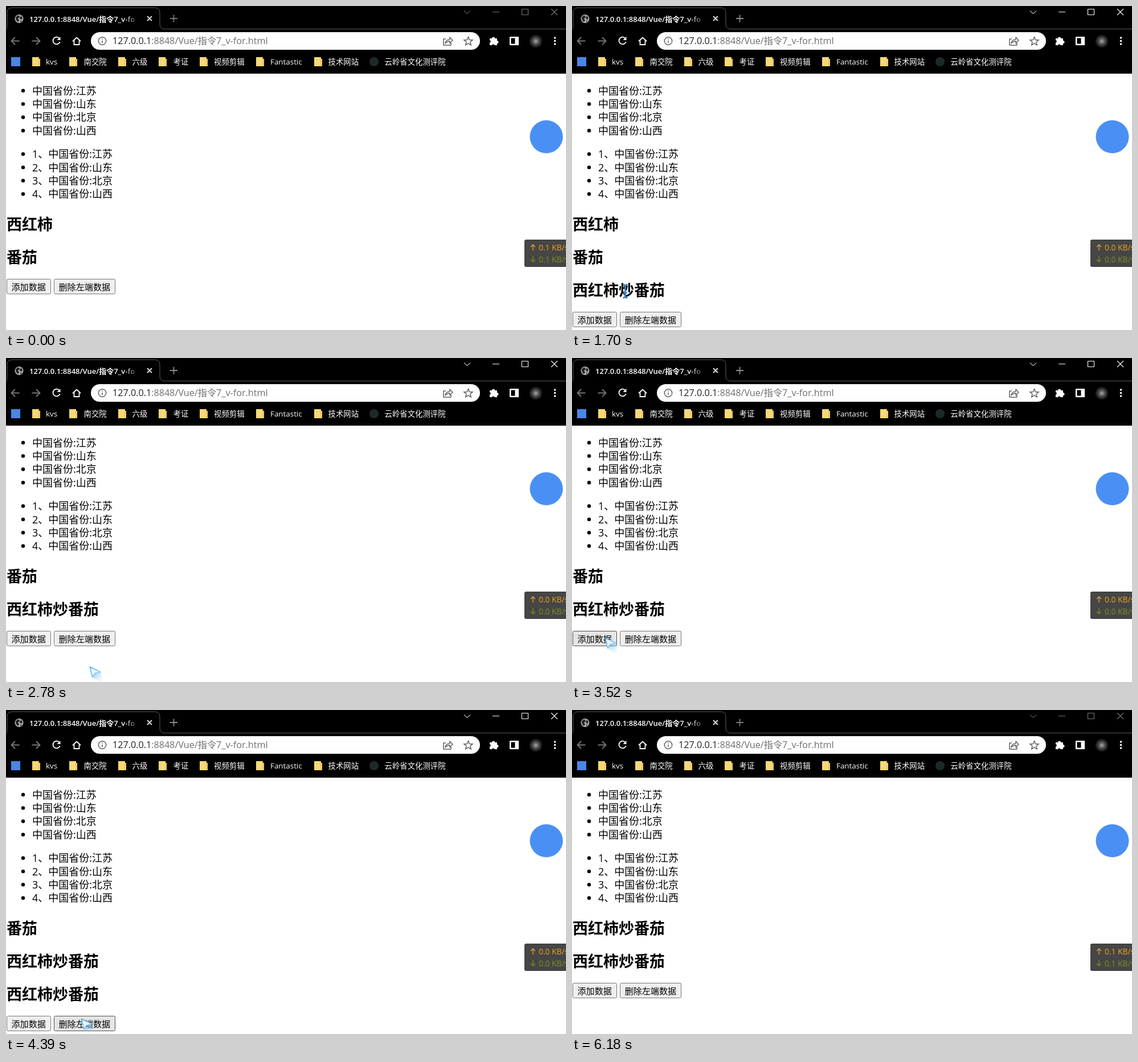
These frames come from a looping animation (983x570 px, 6250 ms). An HTML page:

```html
<!DOCTYPE html>
<html lang="zh">
<head>
<meta charset="utf-8">
<title>v-for</title>
<style>
html, body { margin: 0; width: 100%; height: 100%; overflow: hidden; background: #fff; }
svg { display: block; width: 983px; height: 570px; }
text { font-family: "Open Sans", "Noto Sans CJK SC", "Noto Sans CJK", sans-serif; white-space: pre; }
.line { fill: none; stroke-width: 1.8; }
.list { font-size: 18px; }
.head { font-size: 27px; font-weight: 700; }
.btn { font-size: 15.1px; }
.mark { font-size: 13.4px; font-weight: 500; fill: #fff; }
.net { font-size: 13.8px; }
</style>
</head>
<body>
<svg viewBox="0 0 983 570" xmlns="http://www.w3.org/2000/svg">
  <defs>
    <linearGradient id="fade" gradientUnits="userSpaceOnUse" x1="205" x2="237" y1="0" y2="0">
      <stop offset="0" stop-color="#fff"/><stop offset="1" stop-color="#fff" stop-opacity="0"/>
    </linearGradient>
    <radialGradient id="photo">
      <stop offset="0" stop-color="#a9a9a9"/><stop offset=".5" stop-color="#4a4c4e"/><stop offset="1" stop-color="#0c0c0c"/>
    </radialGradient>
    <linearGradient id="ice" x1="0" y1="0" x2="1" y2="1">
      <stop offset="0" stop-color="#4aa3e6"/><stop offset="1" stop-color="#9ad6f6"/>
    </linearGradient>
    <linearGradient id="trail" gradientUnits="userSpaceOnUse" x1="7" y1="9" x2="23" y2="27">
      <stop offset="0" stop-color="#6cb6ee" stop-opacity=".7"/><stop offset="1" stop-color="#b5e2fa" stop-opacity="0"/>
    </linearGradient>
  </defs>

  <rect width="983" height="570" fill="#fff"/>
  <rect width="983" height="119" fill="#000"/>

  <!-- tab strip -->
  <path d="M0 41Q2 40 2 34V12Q2 3 11 3H261Q270 3 270 12V32Q270 40.5 279 40.5H983" fill="none" stroke="#5c5c5c"/>
  <circle cx="23" cy="22.500" r="7.500" fill="#a9adb1"/>
  <path d="M17 20q3-4 6-3l1 3-3 2 2 3-2 3q-4-3-4-8zM26 17l3 4-2 3-3-2zM25 26l3-1-3 4z" fill="#222"/>
  <text x="41" y="27.800" font-size="13" font-weight="600" fill="url(#fade)">127.0.0.1:8848/Vue/指令7_v-fo</text>
  <path d="M248 18l8 8m0-8l-8 8" class="line" stroke="#e8e8e8"/>
  <path id="plus" d="M288 22h13m-6.500-6.500v13" class="line"/>
  <g id="controls" fill="none" stroke-width="1.100">
    <path d="M804 8.500l5.500 5 5.500-5" opacity=".7"/>
    <path d="M854 10.500h12M905.500 5.500h11v10h-11zM957 5l11 11m0-11l-11 11"/>
  </g>

  <!-- toolbar -->
  <g class="line" stroke="#777">
    <path d="M23.500 61.500H10m6-6.500l-6.500 6.500 6.500 6.500M45.500 61.500H59m-6-6.500l6.500 6.500-6.500 6.500"/>
  </g>
  <g class="line" stroke="#fff">
    <path d="M94 57.500a6.300 6.300 0 1 0 .7 5.500"/>
    <path d="M117 62l7-6.500 7 6.500M119.500 60.500v7.500h9v-7.500"/>
  </g>
  <path d="M95.500 54v6h-6z" fill="#fff"/>
  <rect x="149" y="46" width="683" height="31" rx="15.500" fill="#fff"/>
  <g class="line" stroke="#5f6368" style="stroke-width:1.5">
    <circle cx="169" cy="61.500" r="6.700"/>
    <path d="M169 60.500v4.500m0-8v1.700"/>
    <path d="M772 58h-4v11h13v-4M771 66q1-7 8-7v-4l5 5.500-5 5v-3.500q-5 0-8 4z" stroke-linejoin="round"/>
    <path d="M811.500 54.500l2.100 5 5.400.4-4.100 3.500 1.300 5.300-4.700-2.900-4.700 2.900 1.300-5.300-4.100-3.500 5.400-.4z"/>
  </g>
  <text x="187" y="67.300" font-size="16.150" fill="#6b6f74"><tspan fill="#202124">127.0.0.1</tspan>:8848/Vue/指令7_v-for.html</text>
  <path d="M849 57h4a2.500 2.500 0 0 1 5 0h4v4a2.500 2.500 0 0 1 0 5v3h-4.500a2.300 2.300 0 0 0-4.500 0h-4v-4.500a2.300 2.300 0 0 0 0-4.500z" fill="#fff"/>
  <path d="M884 54h16v15h-16zm2.500 2.500v10h7v-10z" fill="#fff" fill-rule="evenodd"/>
  <circle cx="930" cy="62" r="11.500" fill="url(#photo)"/>
  <g fill="#fff"><circle cx="963.500" cy="56" r="1.800"/><circle cx="963.500" cy="61.500" r="1.800"/><circle cx="963.500" cy="67" r="1.800"/></g>

  <g id="marks"></g>
  <g id="page"></g>

  <!-- floating widgets -->
  <circle cx="948.500" cy="230" r="29" fill="#4a90f4"/>
  <rect x="910.500" y="411.500" width="80" height="47" rx="2" fill="#464646" stroke="#383838"/>
  <g id="net"></g>

  <g id="arrow">
    <path d="M4 18L9 11.500 19 9 24 26 19 28z" fill="url(#trail)"/>
    <path d="M.5.5L4.500 18.500 9.300 11.700 19 9.500z" fill="#e8f6fd" stroke="url(#ice)" stroke-width="1.500" stroke-linejoin="round"/>
  </g>
  <path id="beam" d="M-4-11q3 0 4 2 1-2 4-2M0-9V10M-4 12q3 0 4-2 1 2 4 2M-3 3h6" fill="none" stroke="#3b86bf" stroke-width="2.800"/>
</svg>
<script>
const LOOP = 6250, STEP = 67.1, ROW = 58.3;
const $ = id => document.getElementById(id);
const text = (cls, x, y, s, more = "") => `<text class="${cls}" x="${x}" y="${y}" ${more}>${s}</text>`;

// bookmarks: icon centre, label start, label
const folders = [
  [53, 70, "kvs"], [118, 136.5, "南交院"], [204, 221.5, "六级"], [275, 293.5, "考证"],
  [347, 365, "视频剪辑"], [446, 464, "Fantastic"], [548, 565.5, "技术网站"]
];
$("marks").innerHTML =
  `<rect x="9" y="90" width="16" height="16" fill="#4a86e8"/>` +
  folders.map(([c, x, s]) =>
    `<path d="M${c - 7} 90h12v3h2v13h-14z" fill="#f6d978"/><path d="M${c + 5} 93v13" stroke="#dcb04c"/>` +
    text("mark", x, 103.3, s)).join("") +
  `<circle cx="646" cy="98" r="8" fill="#1c2b29"/>` + text("mark", 664.5, 103.3, "云岭省文化测评院");

// page
const places = ["江苏", "山东", "北京", "山西"];
const list = (top, label) => places.map((p, i) => {
  const y = top + i * 23.4;
  return `<circle cx="30" cy="${y}" r="3.2"/>` + text("list", 46, y + 6.6, label(p, i));
}).join("");
const button = (id, x, w, s) =>
  `<rect id="${id}" x="${x + .5}" y="480.5" width="${w - 1}" height="26" rx="2"/>` + text("btn", x + 8.5, 499.6, s);
$("page").innerHTML =
  list(149, p => "中国省份:" + p) +
  list(260.5, (p, i) => `${i + 1}、中国省份:${p}`) +
  [0, 1, 2].map(i => text("head", 1, 393.5 + i * ROW, "", `id="head${i}"`)).join("") +
  `<g id="buttons">${button("add", 1, 78, "添加数据")}${button("del", 84, 108, "删除左端数据")}</g>`;

const rates = [["up", 430, "#f0a21e", "M925 430v-10m-4 4l4-4 4 4"], ["down", 450.5, "#808f1c", "M925 440v10m-4-4l4 4 4-4"]];
$("net").innerHTML = rates.map(([id, y, c, d]) =>
  `<path d="${d}" fill="none" stroke="${c}" stroke-width="1.3"/>` +
  text("net", 935, y, "", `id="${id}" fill="${c}"`)).join("");

// cursor path: time, x, y
const path = [
  [350, 130, 560], [420, 100, 540], [480, 75, 524], [550, 63, 518], [680, 63, 518], [820, 64, 510],
  [1020, 58, 492], [1500, 58, 492], [1690, 93, 501], [1900, 131, 528], [2027, 144, 536],
  [2090, 146, 541], [2190, 146, 541], [2225, 147, 543], [3060, 147, 543], [3280, 102, 517],
  [3500, 58, 492], [3850, 58, 492], [4070, 82, 503], [4370, 132, 543], [4500, 131, 543],
  [4990, 131, 543], [5045, 150, 540], [5180, 290, 545], [5310, 480, 562], [5380, 520, 600]
];

function cursorAt(t) {
  const i = path.findIndex(k => k[0] > t);
  if (i < 1) return null;
  const [t0, x0, y0] = path[i - 1], [t1, x1, y1] = path[i];
  const u = (t - t0) / (t1 - t0);
  return { x: x0 + (x1 - x0) * u, y: y0 + (y1 - y0) * u };
}

// clicks: press time, release time, headings afterwards
const A = "西红柿", B = "番茄", C = "西红柿炒番茄";
const clicks = [[1440, 1505, [A, B, C]], [2720, 2780, [B, C]], [3790, 3857, [B, C, C]], [4650, 4710, [C, C]]];

function paintButton(id, x, w, dy, pos, down) {
  const over = pos && pos.x >= x && pos.x <= x + w && pos.y >= 480 + dy && pos.y <= 507 + dy;
  const [fill, edge] = !over ? ["#efefef", "#767676"] : down ? ["#f5f5f5", "#8d8d8d"] : ["#e5e5e5", "#4f4f4f"];
  $(id).setAttribute("fill", fill);
  $(id).setAttribute("stroke", edge);
}

function place(id, shown, pos) {
  $(id).style.display = shown ? "" : "none";
  if (shown) $(id).setAttribute("transform", `translate(${pos.x} ${pos.y})`);
}

function render(t) {
  let items = [A, B];
  for (const [, up, next] of clicks) if (t >= up) items = next;
  const down = clicks.some(([a, b]) => t >= a && t < b);
  for (let i = 0; i < 3; i++) $("head" + i).textContent = items[i] || "";
  const dy = (items.length - 2) * ROW;
  $("buttons").setAttribute("transform", `translate(0 ${Math.round(dy)})`);

  // the pointer refreshes about 15 times a second
  const tick = t < 350 ? 0 : 350 + Math.floor((t - 342) / STEP) * STEP;
  const pos = cursorAt(tick);
  paintButton("add", 1, 78, dy, pos, down);
  paintButton("del", 84, 108, dy, pos, down);
  const beam = pos && dy > 0 && pos.x < 162 && pos.y > 482 && pos.y < 519;
  place("arrow", pos && !beam, pos);
  place("beam", beam, pos);

  const active = t >= 1440 && t < 6180;
  $("controls").setAttribute("stroke", active ? "#fff" : "#777");
  $("plus").setAttribute("stroke", active ? "#8c8c8c" : "#777");
  const rate = t >= 350 && t < 5650 ? "0.0 KB/s" : "0.1 KB/s";
  $("up").textContent = $("down").textContent = rate;
}

const start = performance.now();
function loop() {
  render((performance.now() - start) % LOOP);
  requestAnimationFrame(loop);
}
loop();
</script>
</body>
</html>
```
